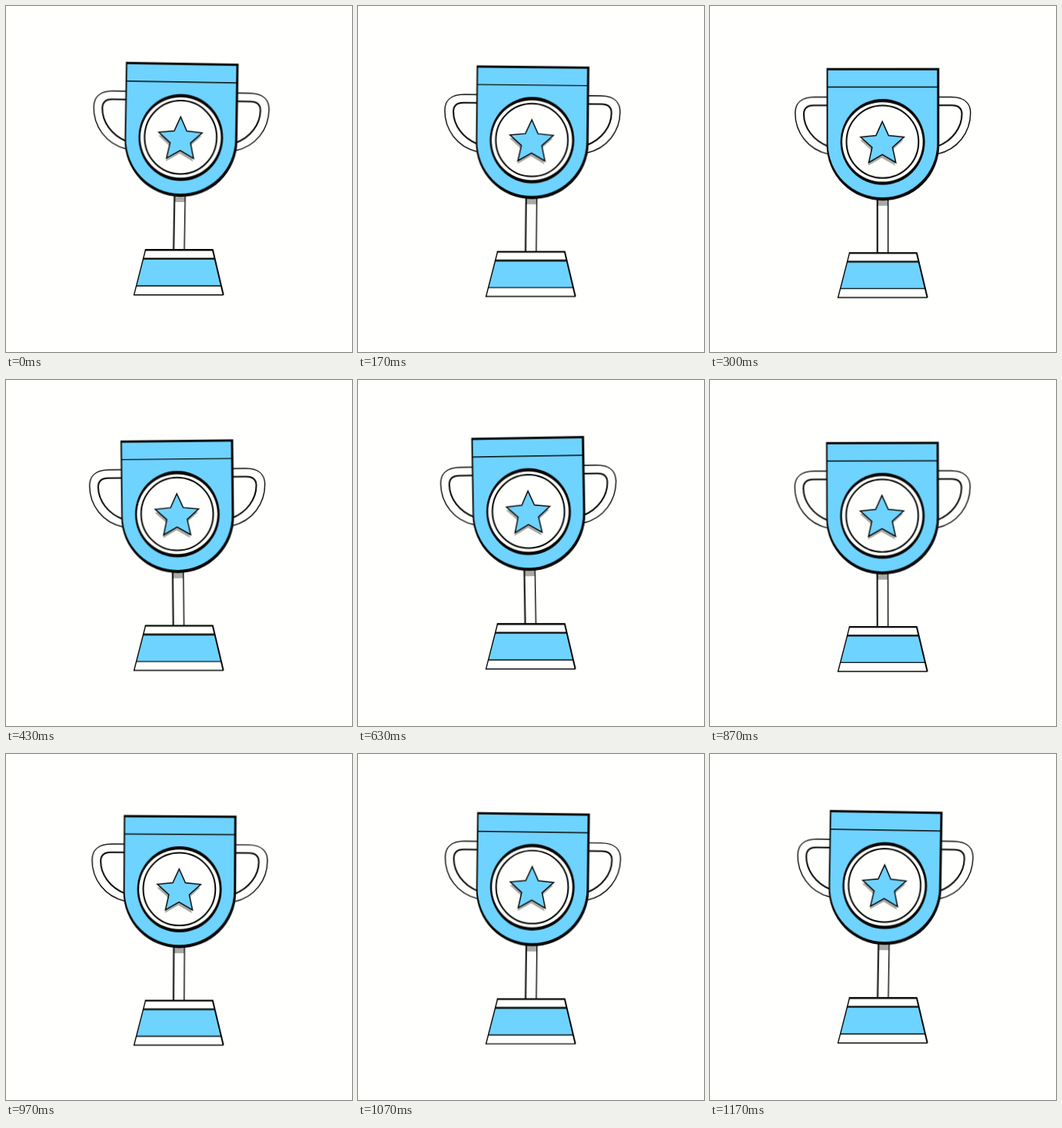
Animation, 450 px wide and 450 px high, one loop 1.2 s. Source, as an HTML page:

```html
<!DOCTYPE html>
<html lang="en">
<head>
<meta charset="utf-8">
<title>Trophy</title>
<style>
  html, body { margin: 0; width: 100%; height: 100%; overflow: hidden; background: #fffffd; }
  svg { display: block; width: 100%; height: 100%; }

  .ink { fill: #060805; }
  .blue { fill: #6fd3ff; }
  .paper { fill: #fffffd; }
  .shade { fill: #a9a9a6; }
  .line { fill: none; stroke: #060805; stroke-width: 1.4; }
  .mid { stroke-width: 2; }
  .bold { stroke-width: 2.4; }

  /* Two bobs for every full sway */
  .bob {
    transform-origin: 225px 376px;
    animation: bob 300ms cubic-bezier(.37, 0, .63, 1) infinite alternate;
  }
  .sway {
    transform-origin: 225px 335px;
    animation: sway 600ms cubic-bezier(.37, 0, .63, 1) infinite alternate;
  }
  @keyframes bob {
    from { transform: translateY(0) scaleY(1); }
    to { transform: translateY(3.4px) scaleY(.9885); }
  }
  @keyframes sway {
    from { transform: rotate(.95deg); }
    to { transform: rotate(-.95deg); }
  }
</style>
</head>
<body>
<svg viewBox="0 0 450 450">
  <defs>
    <g id="handle">
      <path class="line" d="M153 112H136C118 112 110.8 121 110.8 133C110.8 158 127 181 154 187"/>
      <path class="line mid" d="M153 122.8H135C126 122.8 122 127.5 122 134.5C122 152 134 169 154 177"/>
    </g>
    <path id="star" d="M0-29.6L8.2-11.3L28.2-9.3L13.3 4.3L17.6 24.3L0 14L-17.6 24.3L-13.3 4.3L-28.2-9.3L-8.2-11.3Z"/>
  </defs>

  <g class="bob">
    <g class="sway">
      <use href="#handle"/>
      <use href="#handle" transform="matrix(-1 0 0 1 449.6 0)"/>

      <!-- stem -->
      <path class="paper" d="M217.5 244H231.6V320H217.5Z"/>
      <path class="shade" d="M217.5 244H231.6V255H217.5Z"/>
      <path class="line mid" d="M217.7 244V320"/>
      <path class="line" d="M231.6 244V320"/>

      <!-- cup: uneven outline from two nested shapes -->
      <path class="ink" d="M151.6 73.8H298.3V174.8A73.35 73.35 0 0 1 151.6 174.8Z"/>
      <path class="blue" d="M153.5 76.7H295.3V173.2A70.9 70.9 0 0 1 153.5 173.2Z"/>
      <path class="line" d="M152 98.8H297"/>

      <!-- medal -->
      <ellipse class="ink" cx="224.6" cy="171" rx="55" ry="56.6"/>
      <circle class="paper" cx="224.4" cy="171" r="52.3"/>
      <ellipse class="line mid" cx="224.4" cy="170.8" rx="46.9" ry="47.7"/>
      <use class="shade" href="#star" x="223.4" y="178"/>
      <use class="blue" href="#star" x="224.1" y="173.8" stroke="#060805" stroke-width="1.5"/>
    </g>

    <!-- base -->
    <path class="paper" d="M181.5 317H268.8L282.7 375.7H166.5Z"/>
    <path class="blue" d="M178.6 328.6H271.6L279.9 364H169.6Z"/>
    <path class="line" d="M169.6 364H279.9"/>
    <path class="line" d="M181.5 317L166.5 375.7H282.7"/>
    <path class="line mid" d="M268.8 317L282.7 375.7"/>
    <path class="line bold" d="M180.8 317.2H269.5M178.6 328.6H271.6"/>
  </g>
</svg>
</body>
</html>
```
